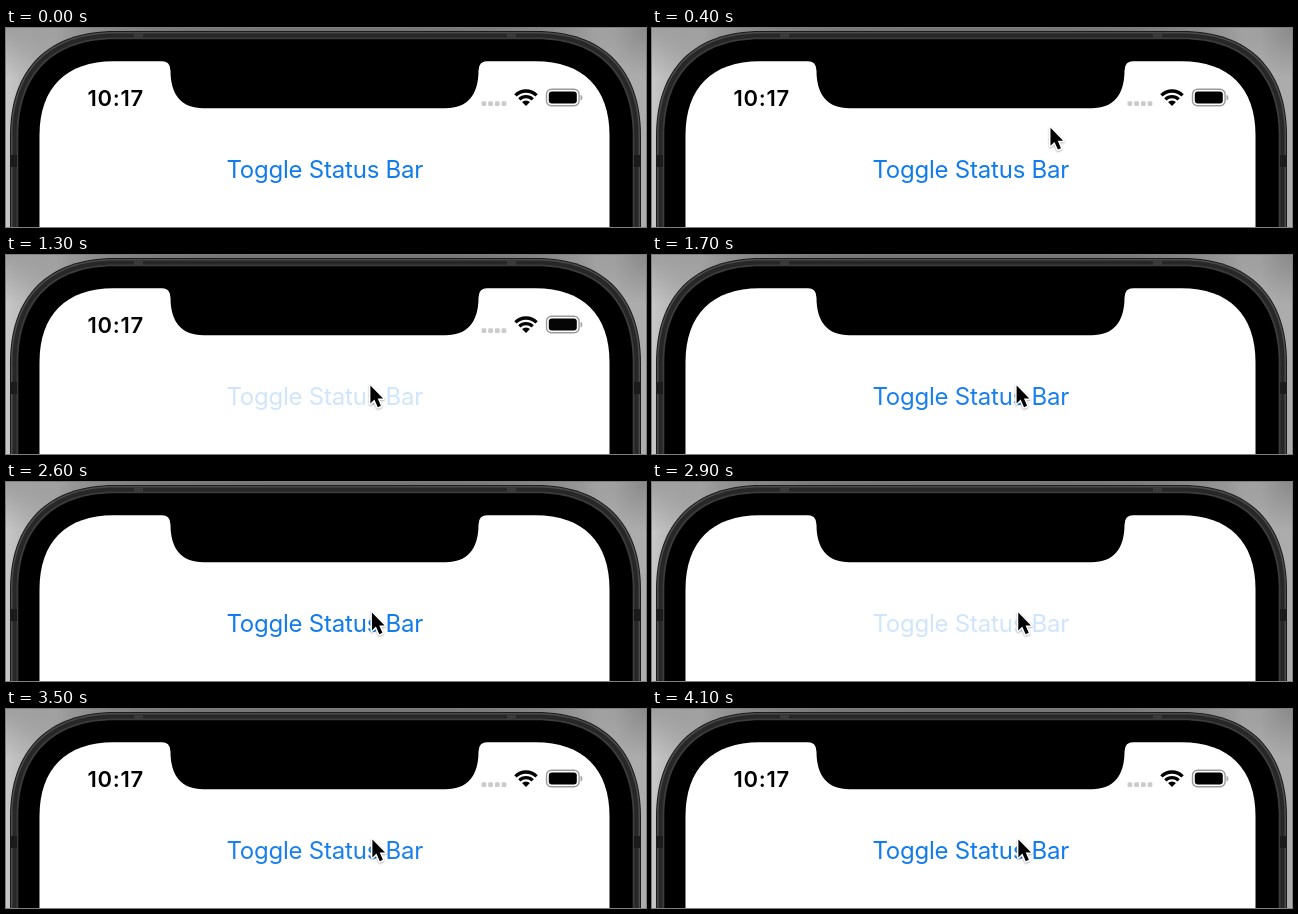
Write an HTML page with a canvas that moves like this. It is 640 by 199 pixels and loops after 4.85 s.

```html
<!DOCTYPE html>
<html lang="en">
<head>
<meta charset="utf-8">
<title>Toggle Status Bar</title>
<style>
html, body { margin: 0; width: 100%; height: 100%; overflow: hidden; background: #fff; }
canvas { display: block; width: 640px; height: 199px; }
</style>
</head>
<body>
<canvas id="stage"></canvas>
<script>
const W = 640, H = 199, LOOP = 4850, STEP = 100;
const PRESS = 900, RELEASE = 1300, TAP_GAP = 1800;
const FONT = 'Inter, Roboto, "Liberation Sans", sans-serif';
const canvas = document.getElementById('stage');
const ctx = canvas.getContext('2d');
const dpr = window.devicePixelRatio || 1;
canvas.width = Math.round(W * dpr);
canvas.height = Math.round(H * dpr);
ctx.scale(dpr, dpr);

// Progress from 0 to 1 over a span of time
const progress = (t, start, span) => Math.min(1, Math.max(0, (t - start) / span));
const easeOut = u => 1 - (1 - u) ** 2;
const smooth = u => u * u * (3 - 2 * u);

// The same tap happens twice, TAP_GAP apart
const tapTime = t => t < 2200 ? t : t - TAP_GAP;

function labelAlpha(t) {
  const tap = tapTime(t);
  const down = smooth(progress(tap, PRESS, 200));
  const up = easeOut(progress(tap, RELEASE, 500));
  return 1 - 0.8 * down * (1 - up);
}

function statusAlpha(t) {
  const shift = smooth(progress(tapTime(t), RELEASE - 30, 350));
  return t < 2200 ? 1 - shift : shift;
}

function cursorAt(t) {
  const e = easeOut(progress(t, 50, 650));
  const drift = 2 * smooth(progress(t, RELEASE, 1900));
  return [524 - 160 * e + drift, -14 + 144 * e];
}

// Rounded top corners; sides run off the bottom of the stage
function shell(left, top, right, size) {
  const c = size * 0.36, b = H + 10;
  ctx.beginPath();
  ctx.moveTo(left, b);
  ctx.lineTo(left, top + size);
  ctx.bezierCurveTo(left, top + c, left + c, top, left + size, top);
  ctx.lineTo(right - size, top);
  ctx.bezierCurveTo(right - c, top, right, top + c, right, top + size);
  ctx.lineTo(right, b);
  ctx.closePath();
}

// Body outline moved inwards by a distance
function ring(inset, color) {
  shell(4 + inset, 3 + inset, 635 - inset, 105 - inset);
  ctx.fillStyle = color;
  ctx.fill();
}

function box(x, y, w, h, r, color) {
  ctx.beginPath();
  ctx.roundRect(x, y, w, h, r);
  ctx.fillStyle = color;
  ctx.fill();
}

function text(str, x, y, font, spacing, color) {
  ctx.font = font + ' ' + FONT;
  ctx.letterSpacing = spacing;
  ctx.fillStyle = color;
  ctx.fillText(str, x, y);
}

function backdrop() {
  const g = ctx.createLinearGradient(0, 0, W, 0);
  for (let p = 0; p <= 1; p += 0.05) {
    const v = 118 + 82 * Math.abs(2 * p - 1) ** 4;
    g.addColorStop(p, `rgb(${v},${v},${v})`);
  }
  ctx.fillStyle = g;
  ctx.fillRect(0, 0, W, H);
  for (const x of [0, W]) {
    const shade = ctx.createRadialGradient(x, 0, 0, x, 0, 50);
    shade.addColorStop(0, 'rgba(0,0,0,0.2)');
    shade.addColorStop(1, 'rgba(0,0,0,0)');
    ctx.fillStyle = shade;
    ctx.fillRect(0, 0, W, H);
  }
}

function phone() {
  ring(0, '#1c1c1d');
  ring(1, '#4a4a4b');
  ring(2.5, '#272728');
  ring(6.5, '#3c3c3d');
  ring(8.3, '#000');
  for (const x of [4, 628]) box(x, 127, 7, 12, 0, '#1b1b1c');
  for (const x of [128, 501]) box(x, 5.5, 9, 5, 0, '#3a3a3b');
  shell(33.5, 33.2, 603.5, 74);
  ctx.fillStyle = '#fff';
  ctx.fill();
}

function notch() {
  const l = 164.5, r = 472.5, top = 32.7, bottom = 80.2;
  ctx.beginPath();
  ctx.moveTo(l - 10, top);
  ctx.quadraticCurveTo(l, top, l, top + 10);
  ctx.bezierCurveTo(l, top + 34, l + 11, bottom, l + 33, bottom);
  ctx.lineTo(r - 33, bottom);
  ctx.bezierCurveTo(r - 11, bottom, r, top + 34, r, top + 10);
  ctx.quadraticCurveTo(r, top, r + 10, top);
  ctx.closePath();
  ctx.fillStyle = '#000';
  ctx.fill();
}

function wifi(x, y) {
  const from = -Math.PI * 0.75, to = -Math.PI * 0.25;
  ctx.strokeStyle = ctx.fillStyle = '#000';
  ctx.lineWidth = 3.3;
  for (const r of [9.4, 15]) {
    ctx.beginPath();
    ctx.arc(x, y, r, from, to);
    ctx.stroke();
  }
  ctx.beginPath();
  ctx.moveTo(x, y);
  ctx.arc(x, y, 5.6, from, to);
  ctx.fill();
}

function battery() {
  ctx.beginPath();
  ctx.roundRect(540.5, 61.2, 32.6, 16.6, 5);
  ctx.lineWidth = 1.4;
  ctx.strokeStyle = '#9a9a9a';
  ctx.stroke();
  box(542.8, 63.5, 28, 12, 3, '#000');
  box(574.5, 67, 1.8, 5.4, [0, 2, 2, 0], '#a5a5a5');
}

function statusBar(alpha) {
  ctx.globalAlpha = alpha;
  text('10:17', 81.5, 78, '600 22px', '0.7px', '#000');
  for (let i = 0; i < 4; i++) box(475.5 + i * 6.7, 73.3, 4.8, 4.8, 1.4, '#cbcbcb');
  wifi(520, 78);
  battery();
  ctx.globalAlpha = 1;
}

function label(alpha) {
  ctx.globalAlpha = alpha;
  text('Toggle Status Bar', 220.4, 150, '400 24px', '-0.22px', '#0f7bee');
  ctx.globalAlpha = 1;
}

function cursor(x, y) {
  const arrow = [[0, 0], [0, 18], [4, 14.2], [7.4, 21.8], [10.5, 20.4], [7.3, 13], [12.7, 13]];
  ctx.save();
  ctx.translate(x + 0.4, y + 0.4);
  ctx.beginPath();
  arrow.forEach(p => ctx.lineTo(...p));
  ctx.closePath();
  ctx.lineWidth = 3;
  ctx.lineJoin = 'round';
  ctx.strokeStyle = '#fff';
  ctx.shadowColor = 'rgba(0,0,0,0.3)';
  ctx.shadowBlur = 2 * dpr;
  ctx.shadowOffsetY = dpr;
  ctx.stroke();
  ctx.shadowColor = 'transparent';
  ctx.fillStyle = '#000';
  ctx.fill();
  ctx.restore();
}

function draw(now) {
  const t = Math.floor((now % LOOP) / STEP) * STEP;
  backdrop();
  phone();
  notch();
  statusBar(statusAlpha(t));
  label(labelAlpha(t));
  if (t >= 100) cursor(...cursorAt(t));
}

const start = performance.now();
function frame() {
  draw(performance.now() - start);
  requestAnimationFrame(frame);
}
frame();
</script>
</body>
</html>
```
